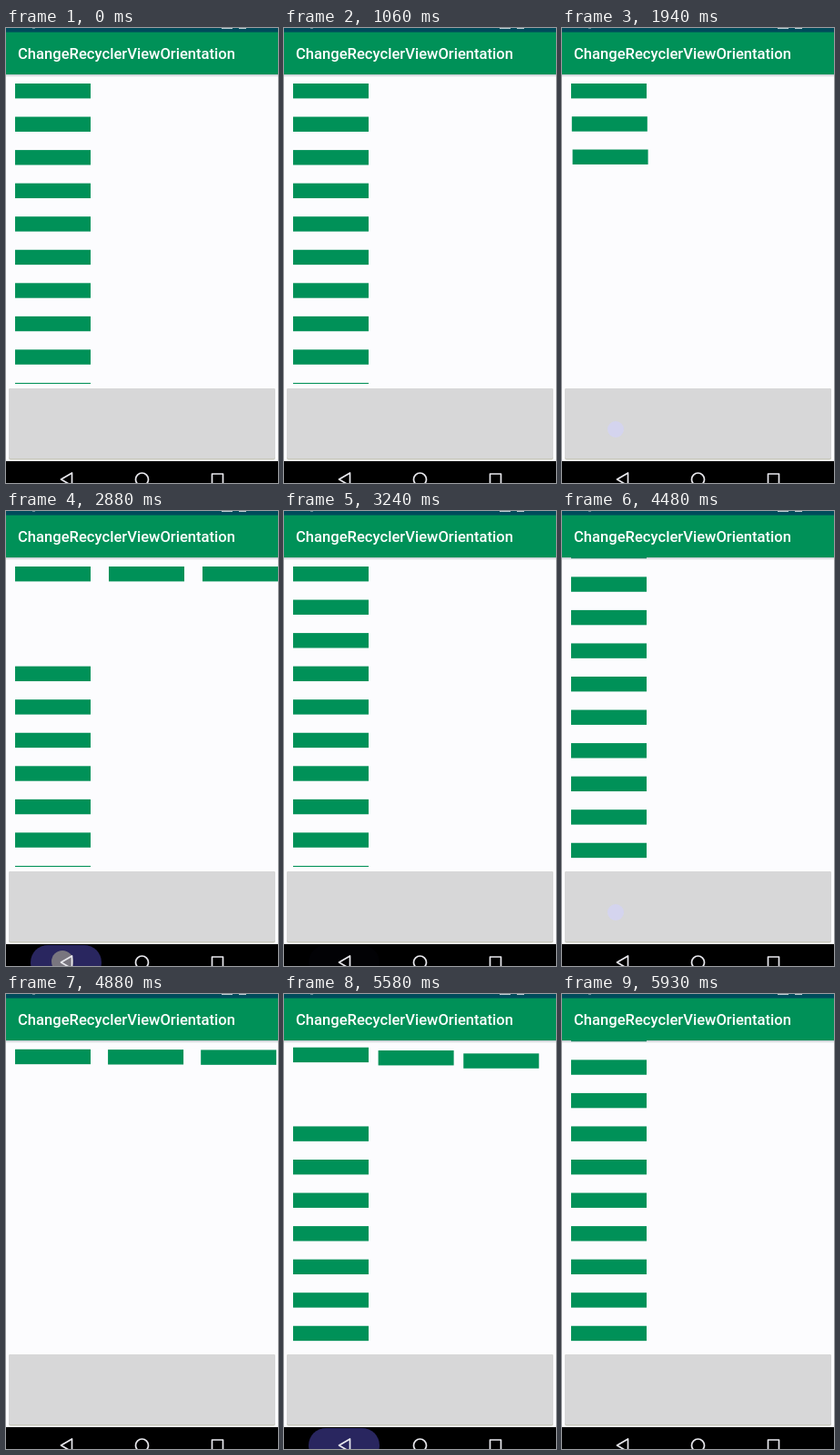
Animation of 299x500 px, one loop 6370 ms. Source, as an HTML page with a canvas:

```html
<!DOCTYPE html>
<html lang="en">
<head>
<meta charset="utf-8">
<title>List orientation</title>
<style>
html, body { margin: 0; width: 100%; height: 100%; overflow: hidden; background: #fcfcfe; }
canvas { display: block; width: 299px; height: 500px; }
</style>
</head>
<body>
<canvas id="stage" width="299" height="500"></canvas>
<script>
const ctx = document.getElementById('stage').getContext('2d');
const LOOP = 6370;
const GREEN = '#009158', PAPER = '#fcfcfe', ICON = '#e9e9ee';
const TOP = 51, BOTTOM = 391, PITCH = 36.55, MAX_SCROLL = 25.2;

// Bursts of motion: start, end, frame count, a moment on the frame grid.
const bursts = [
  [1590, 2170, 13, 1940],
  [2700, 3240, 12, 2880],
  [3560, 4180, 15, 3910],
  [4310, 4880, 14, 4880],
  [5320, 5930, 9, 5930]
];

const clamp = (v, a = 0, b = 1) => Math.min(b, Math.max(a, v));
const ramp = (t, a, b) => clamp((t - a) / (b - a));
const ease = p => (1 - Math.cos(Math.PI * p)) / 2;
const move = (t, start) => ease(ramp(t, start, start + 250));
const mix = (a, b, p) => a + (b - a) * p;

function stepTime(t) {
  let held = 0;
  for (const [from, to, count, anchor] of bursts) {
    if (t < from) break;
    const step = (to - from) / (count - 1);
    held = clamp(anchor + Math.floor((t - anchor) / step + 1e-6) * step, from, to);
  }
  return held;
}

function rect(x, y, w, h, color) {
  ctx.fillStyle = color;
  ctx.fillRect(x, y, w, h);
}

function disc(x, y, r, color) {
  ctx.fillStyle = color;
  ctx.beginPath();
  ctx.arc(x, y, r, 0, Math.PI * 2);
  ctx.fill();
}

function pill(x, y, w, h, r, color) {
  ctx.fillStyle = color;
  ctx.beginPath();
  ctx.roundRect(x, y, w, h, r);
  ctx.fill();
}

const dragAt = t => 110 * ease(ramp(t, 3600, 3930));
const touch = (x, y) => disc(x, y, 9, 'rgba(210,210,250,.65)');

function drawGlow(t) {
  const pull = ramp(dragAt(t), 35, 108);
  const fade = 1 - ramp(t, 3960, 4180);
  if (!pull || !fade) return;
  const height = 38 * pull * mix(0.4, 1, fade);
  ctx.globalAlpha = fade;
  disc(102, BOTTOM - height + 704, 704, '#d3f6fd');
  ctx.globalAlpha = 1;
}

function drawList(t) {
  ctx.save();
  ctx.beginPath();
  ctx.rect(0, TOP, 299, BOTTOM - TOP);
  ctx.clip();
  drawGlow(t);

  const scroll = clamp(dragAt(t) - 8, 0, MAX_SCROLL);
  const second = t >= 4310;
  const toRow = move(t, second ? 4645 : 1926);
  const toColumn = move(t, second ? 5500 : 2880);
  const across = toRow * (1 - toColumn);
  const hidden = toRow > 0 && t < (second ? 5500 : 2880);

  for (let i = 0; i < 10; i++) {
    if (i > 2 && hidden) continue;
    const p = i < 3 ? across : 0;
    rect(10 + 103 * i * p, mix(61 + PITCH * i - scroll, 61, p), 83, 16.4, GREEN);
  }
  ctx.restore();
}

function drawHeader() {
  const shade = ctx.createLinearGradient(0, TOP, 0, TOP + 3);
  shade.addColorStop(0, 'rgba(90,110,120,.38)');
  shade.addColorStop(1, 'rgba(90,110,120,0)');
  rect(0, TOP, 299, 3, shade);
  rect(0, 0, 299, TOP, GREEN);
  rect(0, 0, 299, 4.6, '#004b5b');
  rect(237, 0, 12, 1, '#b9cdd2');
  rect(256, 0, 8, 1, '#b9cdd2');
  rect(29, 0, 3, 1, '#5f8b96');
  ctx.fillStyle = '#fff';
  ctx.font = '500 16.6px Roboto, sans-serif';
  ctx.fillText('ChangeRecyclerViewOrientation', 13, 34);
}

function drawNav(t) {
  rect(0, 476, 299, 24, '#000');
  const start = t < 4000 ? 2700 : 5320;
  const grow = ramp(t, start, start + 150);
  const fade = 1 - ramp(t, start + 230, start + 540);
  if (grow && fade) {
    const half = 39 * grow;
    ctx.globalAlpha = fade;
    pill(66 - half, 477, half * 2, 38, Math.min(19, half), '#29265f');
    ctx.globalAlpha = 1;
  }
  if (t >= start && t < start + 225) disc(62, 495, 12, '#79767f');

  ctx.strokeStyle = ICON;
  ctx.lineWidth = 1.7;
  ctx.lineJoin = 'round';
  ctx.beginPath();
  ctx.moveTo(60.5, 496);
  ctx.lineTo(72.5, 489);
  ctx.lineTo(72.5, 503);
  ctx.closePath();
  ctx.stroke();
  ctx.beginPath();
  ctx.arc(149.5, 496, 7, 0, Math.PI * 2);
  ctx.stroke();
  ctx.strokeRect(226.5, 490, 12, 13);
}

function draw(now) {
  const t = stepTime(now % LOOP);
  rect(0, 0, 299, 500, PAPER);
  drawList(t);
  pill(3, 396, 293, 78.5, 2, '#c9c9bd');
  pill(3, 396, 293, 77, 2, '#d7d7d8');
  drawHeader();
  drawNav(t);

  if (t >= 1590 && t < 1980) touch(59, 441);
  if (t >= 3560 && t < 3970) touch(62.5, 325 - dragAt(t));
  if (t >= 4310 && t < 4690) touch(59, 441);
}

const origin = performance.now();
function tick() {
  draw(performance.now() - origin);
  requestAnimationFrame(tick);
}
tick();
</script>
</body>
</html>
```
